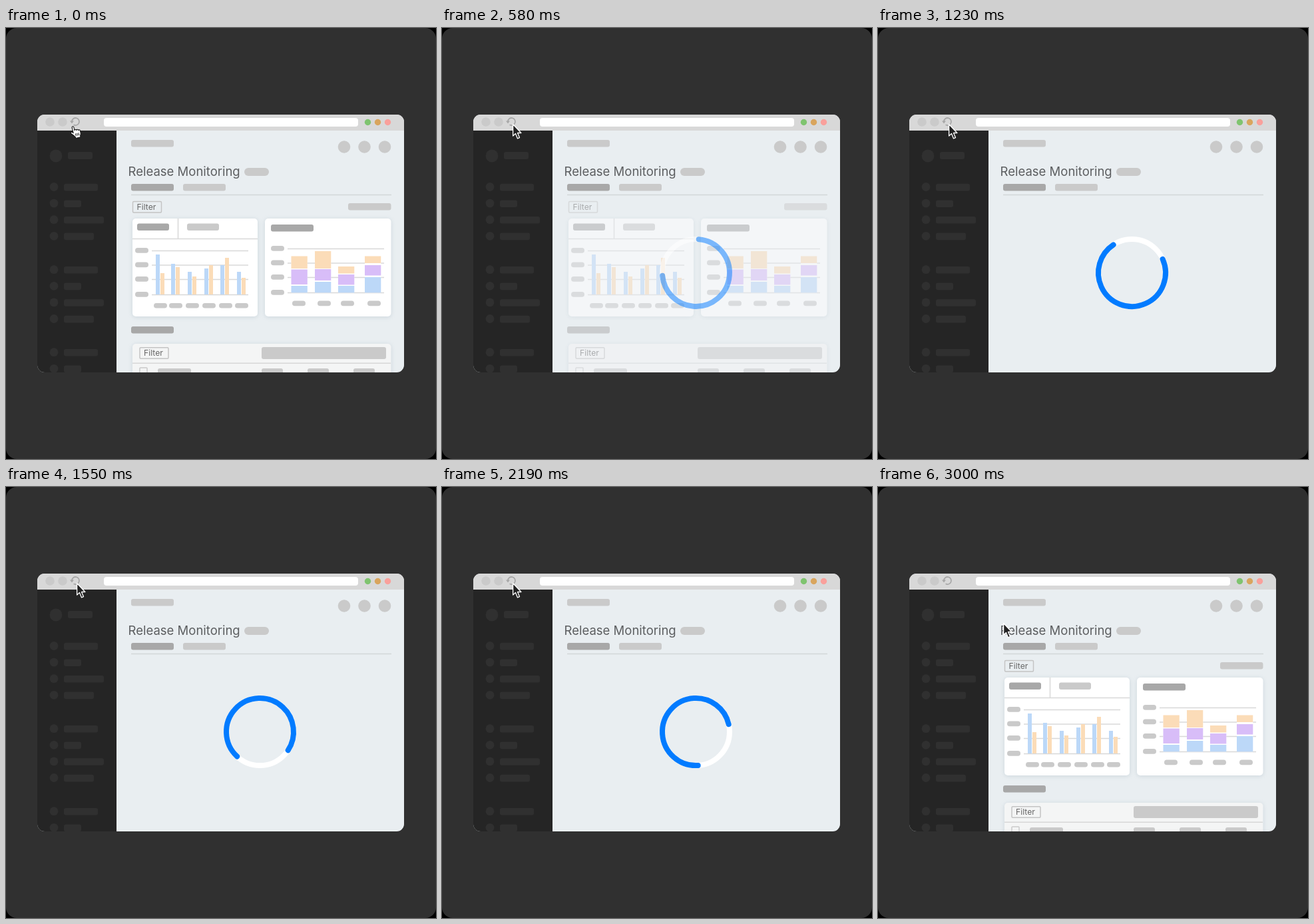
An HTML page for the animation above (3750 ms loop, 646 px wide and 647 px high).

```html
<!DOCTYPE html>
<html lang="en">
<head>
<meta charset="utf-8">
<title>Release Monitoring</title>
<style>
  html, body { margin: 0; width: 100%; height: 100%; overflow: hidden; background: #000; }
  svg { display: block; width: 646px; height: 647px; font-family: Inter, sans-serif; }
  .card { filter: drop-shadow(0 1px 3px rgba(90, 120, 140, .2)); }
</style>
</head>
<body>
<svg viewBox="0 0 646 647">
  <defs><clipPath id="frame"><rect x="47" y="130" width="551" height="387" rx="11"/></clipPath></defs>
  <rect width="646" height="647" rx="16" fill="#303030"/>
  <g clip-path="url(#frame)">
    <g id="shell"></g>
    <g id="dash"></g>
    <g id="spinner" fill="none" stroke-width="8">
      <circle cx="381.5" cy="367.5" r="50.5" stroke="#fff"/>
      <circle id="arc" cx="381.5" cy="367.5" r="50.5" stroke="#027bff" stroke-linecap="round"
        pathLength="360" stroke-dasharray="260.5 99.5"/>
    </g>
  </g>
  <g id="hand" transform="translate(94.6 149.2) rotate(-14) scale(1.08)" stroke="#111" stroke-linejoin="round">
    <path fill="#fff" d="M4 13 1 9.2Q0 7.2 1.5 7 2.8 7 4 9V1.5Q4 0 5.3 0 6.6 0 6.6 1.5V6Q6.8 5 8 5 9.2 5 9.2 6.5 9.5 5.5 10.6 5.6 11.8 5.8 11.8 7.2 12.2 6.5 13 6.7 14 7 14 8.5V11Q14 13 12.5 15V17H5.5V15.5Z"/>
    <path fill="none" stroke-width=".9" d="M6.7 10.5v3.5M8.8 10.5v3.5M10.9 10.5v3.5"/>
  </g>
  <path id="arrow" fill="#222" stroke="#fff" stroke-width="1.3" stroke-linejoin="round"
    d="M0 0V17.5L3.9 14 6.9 21.4 9.9 20.1 6.9 13H12.3Z"/>
</svg>
<script>
const $ = id => document.getElementById(id);
const LIGHT = '#cacaca', MID = '#a8a8a8', GRID = '#d8d8d8';
const BLUE = '#bcd8f8', ORANGE = '#fbdcb8', PURPLE = '#d8bdf8';

const rect = (x, y, w, h, fill = LIGHT, r = 3, extra = '') =>
  `<rect x="${x}" y="${y}" width="${w}" height="${h}" rx="${r}" fill="${fill}" ${extra}/>`;
const dot = (x, y, r, fill = LIGHT) => `<circle cx="${x}" cy="${y}" r="${r}" fill="${fill}"/>`;
const line = (d, color = GRID, width = 1.5) => `<path d="${d}" fill="none" stroke="${color}" stroke-width="${width}"/>`;
const text = (x, y, size, fill, s) => `<text x="${x}" y="${y}" font-size="${size}" fill="${fill}">${s}</text>`;
const pill = (x, y) => rect(x, y, 20, 7.6, LIGHT, 3.8);
const each = (list, fn) => list.map(fn).join('');
const filterBox = (x, y) =>
  rect(x, y, 43, 16.5, 'none', 1.5, 'stroke="#c4c4c4" stroke-width="1.5"') + text(x + 6, y + 12.6, 12.2, '#666', 'Filter');

function shell() {
  const widths = [51, 26, 60, 45];
  const menu = each([238.5, 362.7, 486.7], top => each(widths, (w, i) => {
    const y = top + i * 24.6;
    return dot(72, y, 6.4, '#303030') + rect(87, y - 4.7, w, 10.6, '#303030');
  }));
  return rect(47, 130, 551, 387, '#e9eef1', 0) +
    rect(47, 154, 119, 363, '#252525', 0) +
    rect(47, 130, 551, 24, '#d8d8d8', 0) +
    dot(66, 141, 6.8) + dot(85, 141, 6.8) +
    line('M99 140.5A5.5 5.5 0 1 1 101.6 145.2', MID, 1.8) +
    `<path d="M96 139.5h6l-3 4z" fill="${MID}"/>` +
    rect(147, 135, 382, 13, '#fff', 4) +
    dot(543.5, 141.5, 4.7, '#7fc46f') + dot(558.5, 141.5, 4.7, '#d9a55d') + dot(573.5, 141.5, 4.7, '#f9a09b') +
    dot(75, 192, 9.4, '#303030') + rect(93, 186, 37, 11, '#303030') + menu +
    rect(188, 168, 64, 10.6) + each([508, 538.5, 569], x => dot(x, 178.5, 9.3)) +
    text(183.6, 222, 18.5, '#5c5e60', 'Release Monitoring') +
    rect(358, 210, 37, 12, LIGHT, 6) +
    rect(188, 234, 64, 10.4, MID) + rect(266, 234, 64, 10.4) +
    line('M188 250.5H579', '#d2d6d8', 1.3);
}

function barChart() {
  const bars = [[225, 340, 368], [248, 354, 359], [273, 366, 373], [298, 361, 356], [322, 356, 345], [347, 366, 375]];
  return rect(190, 286, 188, 147, '#fff', 5, 'class="card"') +
    line('M190 316.5H378M258.5 286V316') +
    rect(197, 293.5, 48, 10.6, MID) + rect(272, 293.5, 48, 10.6) +
    each([334.5, 356, 377.5, 400.5], y => line(`M219 ${y}H364`) + pill(194, y - 4.4)) +
    each(bars, ([x, a, b]) => rect(x, a, 6, 400 - a, BLUE, 0) + rect(x + 7, b, 6, 400 - b, ORANGE, 0)) +
    each([222, 245, 270, 295, 320, 344], x => pill(x, 413));
}

function stackChart() {
  // x, then top and bottom of the orange, purple and blue parts
  const stacks = [
    [428.5, 342.5, 361, 362.5, 385, 387], [464, 335, 361, 362, 379, 381],
    [499, 358, 368.5, 370, 385.5, 387], [539, 342.5, 353, 356, 371.5, 374]];
  return rect(389, 286, 189.5, 147, '#fff', 5, 'class="card"') +
    rect(398, 295, 64, 10.6, MID) +
    each([331.5, 353, 374.5, 397.5], y => line(`M423 ${y}H568`) + pill(398, y - 4.4)) +
    each(stacks, ([x, a, b, c, d, e]) => rect(x, a, 24.3, 397.3 - a, '#fff', 0) +
      rect(x, a, 24.3, b - a, ORANGE, 0) + rect(x, c, 24.3, d - c, PURPLE, 0) + rect(x, e, 24.3, 397.3 - e, BLUE, 0)) +
    each([430, 468, 503, 543], x => pill(x, 409.6));
}

function table() {
  return rect(188, 448, 64, 10.6, MID) +
    rect(190, 474, 388.5, 60, '#f4f5f5', 5, 'class="card"') +
    filterBox(201, 479.7) + rect(384, 479, 187, 18) +
    line('M190 503.3H578') +
    rect(201, 510, 11, 11, 'none', 1, `stroke="${LIGHT}" stroke-width="1.5"`) +
    rect(228, 511, 50, 10) + each([384, 453, 522], x => rect(x, 511, 32, 10));
}

$('shell').innerHTML = shell();
$('dash').innerHTML = filterBox(190.5, 260.5) + rect(514, 263, 64.5, 10.4) + barChart() + stackChart() + table();

const LOOP = 3750, STEP = 80;
// Time since start, advancing in 80 ms steps
const since = (t, start) => Math.floor((t - start) / STEP) * STEP;
const easeOut = p => 1 - (1 - Math.min(1, Math.max(0, p))) ** 1.7;
const ease = (t, start) => easeOut((since(t, start) + 40) / 350);

function draw(t) {
  const loading = t >= 500 && t < 2270, leaving = t >= 2680;
  const fade = loading ? ease(t, 500) : 0;
  const spin = t >= 1150 ? (since(t, 1150) + 20) * .49 : 0;
  $('dash').setAttribute('opacity', 1 - fade);
  $('spinner').setAttribute('opacity', fade);
  $('arc').setAttribute('transform', `rotate(${262 + 25 * fade + spin} 381.5 367.5)`);

  const move = leaving ? ease(t, 2680) : 0;
  $('hand').style.display = loading || leaving ? 'none' : '';
  $('arrow').style.display = loading || leaving ? '' : 'none';
  $('arrow').setAttribute('transform', `translate(${106.6 + 82 * move} ${144.5 + 60 * move})`);
}

function tick() {
  draw(performance.now() % LOOP);
  requestAnimationFrame(tick);
}
tick();
</script>
</body>
</html>
```
